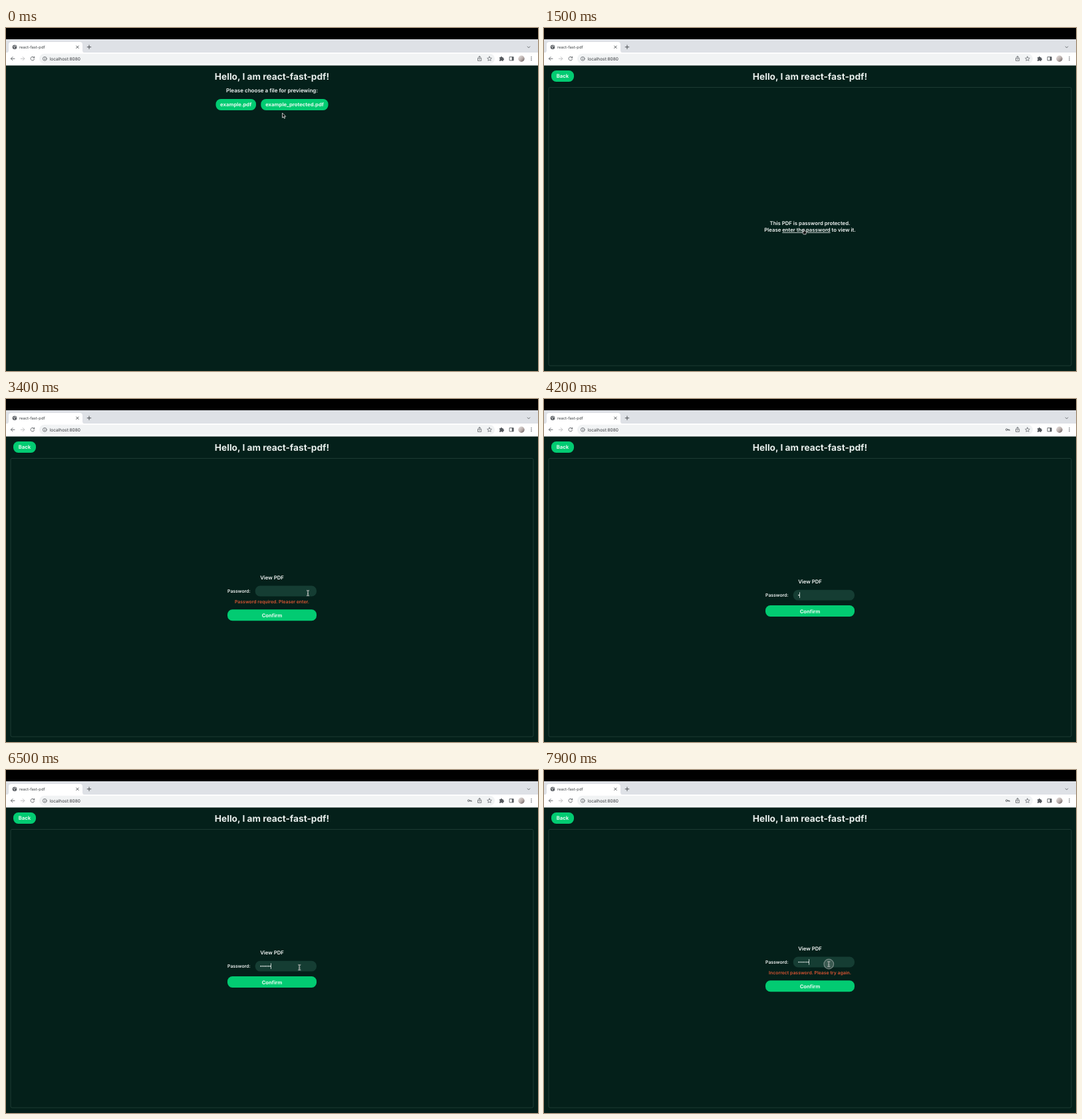
Animation of 800 by 517 pixels, one loop 8000 ms. Source, as an HTML page:

```html
<!DOCTYPE html>
<html lang="en">
<head>
<meta charset="utf-8">
<title>react-fast-pdf</title>
<style>
  html, body { margin: 0; width: 100%; height: 100%; overflow: hidden; background: #04201a; }
  svg { display: block; width: 100vw; height: 100vh; }
  text { font-family: Inter, "Open Sans", sans-serif; text-rendering: geometricPrecision; }
  .page text { font-weight: 600; fill: #f3f6f5; text-anchor: middle; font-size: 7.75px; }
  .page .title { font-weight: 700; font-size: 13.7px; fill: #e8eeec; }
  .page .small { font-size: 6.8px; }
  .page .error { font-size: 6.9px; fill: #dc5533; }
  .page .btn rect { fill: #02cb72; }
  .page .btn text { font-weight: 700; font-size: 7.7px; fill: #e6fbf0; }
  .icon { fill: none; stroke: #5a5e63; stroke-width: .9; stroke-linecap: round; stroke-linejoin: round; }
  .solid { fill: #55595e; }
</style>
</head>
<body>
<svg viewBox="0 0 800 517" preserveAspectRatio="none">
  <defs>
    <linearGradient id="avatar" x2="1" y2="1">
      <stop stop-color="#e9e4e2"/><stop offset=".55" stop-color="#b9aeab"/><stop offset="1" stop-color="#5d5355"/>
    </linearGradient>
  </defs>

  <g id="browser">
    <rect width="800" height="17"/>
    <rect y="17" width="800" height="20" fill="#dee1e6"/>
    <path d="M0 37.5Q4 37.5 4 33.500V25Q4 21 8 21H111Q115 21 115 25V33.500Q115 37.500 119 37.500Z" fill="#fff"/>
    <rect y="37" width="800" height="19.500" fill="#fff"/>
    <rect x="50" y="38.800" width="685" height="15" rx="7.500" fill="#f1f3f4"/>
    <circle class="solid" cx="13" cy="28.800" r="3.300"/>
    <path d="M10.800 27.500l2 .8-.4 1.400 1 1.300M13.300 26.200l.6 1.200 1.500.5" fill="none" stroke="#fff" stroke-width=".8"/>
    <text x="20" y="31" font-size="5.800" fill="#3c4043">react-fast-pdf</text>
    <text x="65.700" y="48.500" font-size="6.550" fill="#35383c">localhost:8080</text>
    <g class="icon">
      <path d="M105.700 27l3.500 3.500m0-3.500l-3.500 3.500M122.200 28.700h5.600m-2.800-2.800v5.600" stroke="#3f4347"/>
      <path d="M784.200 28l1.800 1.800 1.800-1.800"/>
      <path d="M13 46.200H7.500m2.500-2.600l-2.600 2.600 2.600 2.600"/>
      <path d="M22.300 46.200h5.500m-2.500-2.600l2.600 2.600-2.600 2.600" stroke="#babcbe"/>
      <path d="M42.200 44.500a2.800 2.800 0 1 0 .4 2.500M42.700 43.200v1.800h-1.800"/>
      <circle cx="58.300" cy="46.300" r="2.900" stroke-width=".8"/>
      <path d="M58.300 46.200v1.500m0-3v.1" stroke-width=".8"/>
      <path d="M710.900 45.300h-1.400v4h5.200v-4h-1.400M712.100 47.500v-5m-1.500 1.400l1.500-1.500 1.500 1.500" stroke-width=".8"/>
      <path d="M727 43l1 2.200 2.400.2-1.800 1.600.5 2.300-2.100-1.200-2.100 1.200.5-2.300-1.800-1.600 2.400-.2Z" stroke-width=".7"/>
      <rect x="757.500" y="43.600" width="5.600" height="5.300"/>
    </g>
    <path class="solid" d="M742 44.200h1.700a1.200 1.200 0 0 1 2.400 0h1.700v1.600a1.200 1.200 0 0 1 0 2.400v1.500h-1.900a1.100 1.100 0 0 0-2.100 0H742v-1.900a1.100 1.100 0 0 0 0-2.100Z"/>
    <rect class="solid" x="760.700" y="43.600" width="2.400" height="5.300"/>
    <circle cx="775" cy="46.200" r="4.700" fill="url(#avatar)"/>
    <g class="solid"><circle cx="790" cy="43.800" r=".75"/><circle cx="790" cy="46.200" r=".75"/><circle cx="790" cy="48.600" r=".75"/></g>
    <g id="key">
      <circle class="icon" cx="695.700" cy="46.200" r="1.400" stroke-width="1.100"/>
      <path class="icon" d="M697.200 46.200h2.900v1.300m-1.300-1.200v1" stroke-width="1.100"/>
    </g>
  </g>

  <g class="page">
    <text class="title" x="400" y="77.800">Hello, I am react-fast-pdf!</text>

    <g id="chooser">
      <text x="400" y="97.200" style="font-size:8.050px">Please choose a file for previewing:</text>
      <g class="btn"><rect x="315.500" y="107" width="60.500" height="17" rx="7.500"/><text x="345.700" y="118.200">example.pdf</text></g>
      <g class="btn"><rect x="383.300" y="107" width="101.200" height="17" rx="7.500"/><text x="434" y="118.200">example_protected.pdf</text></g>
    </g>

    <g id="viewer">
      <g class="btn"><rect x="11" y="64" width="34" height="17" rx="7.500"/><text x="28" y="75.300">Back</text></g>
      <rect x="7" y="89.500" width="786" height="419.500" rx="2" fill="none" stroke="#1c3b33"/>
    </g>

    <g id="locked">
      <text x="400" y="297.300">This PDF is password protected.</text>
      <text x="400" y="307.100">Please <tspan text-decoration="underline">enter the password</tspan> to view it.</text>
    </g>

    <g id="form">
      <g id="fields">
        <text x="400" y="278.300">View PDF</text>
        <text class="small" x="350.300" y="298.200">Password:</text>
        <rect x="374.700" y="287.800" width="92.300" height="15.800" rx="7.500" fill="#153d33"/>
        <g id="dots" fill="#f0f4f2"></g>
        <rect id="caret" y="291.300" width=".8" height="8.600" fill="#e8eeec"/>
      </g>
      <text class="error" id="error" x="400" y="308"></text>
      <g class="btn" id="confirm"><rect x="333" y="311" width="134" height="17" rx="7.500"/><text x="400" y="322.500">Confirm</text></g>
    </g>
  </g>

  <g id="cursor">
    <circle id="ring" r="7.300" fill="#8d9a95" fill-opacity=".3" stroke="#a3aeaa" stroke-opacity=".65" stroke-width="1.200"/>
    <path id="arrow" d="M0 0V7.300L1.700 5.800 2.900 8.400 4.100 7.900 2.900 5.300H5.200Z" fill="#111" stroke="#fff" stroke-width=".7"/>
    <path id="hand" d="M-.8-2.200Q0-3 .6-2.200V.3L2.800.8Q3.600 1.100 3.500 2L3 5.400H-.8L-2.800 2.400Q-2.600 1.200-.8 2.500Z" fill="#111" stroke="#fff" stroke-width=".7"/>
    <g id="beam" fill="none">
      <path d="M-1.900-4Q-.2-4 0-3 .2-4 1.900-4M0-3V3M-1.900 4Q-.2 4 0 3 .2 4 1.900 4M-1 .9H1" stroke="#d9e0dd" stroke-width="1.500"/>
      <path d="M-1.700-4Q-.2-4 0-3 .2-4 1.700-4M0-3V3M-1.700 4Q-.2 4 0 3 .2 4 1.700 4" stroke="#26362f" stroke-width=".6"/>
    </g>
  </g>
</svg>
<script>
const LOOP = 8000, STEP = 100, PITCH = 2.35;
const $ = id => document.getElementById(id);
const show = (id, on) => $(id).style.display = on ? '' : 'none';
const within = (t, a, b) => t >= a && t < b;

// time, x, y of the pointer
const path = [
  [0, 415.5, 128], [400, 429, 117], [600, 429, 117], [1400, 391, 305.5],
  [2100, 391, 305.5], [2400, 446, 291], [2700, 432, 322], [3000, 432, 322],
  [3400, 454, 292.5], [3500, 456, 293], [3700, 512, 299], [5400, 512, 299],
  [5700, 562, 293], [6300, 443, 297], [6400, 441.3, 297.5], [6600, 441.3, 297.5],
  [7000, 433, 329], [7300, 433, 329], [7800, 428.3, 292.5], [8000, 428.3, 292.5]
];
const clicks = [500, 1700, 2700, 3500, 7100, 7900];
const typed = [4100, 4300, 4500, 4800, 5000, 5200, 5500];

for (let i = 0; i < typed.length; i++) {
  const dot = document.createElementNS('http://www.w3.org/2000/svg', 'circle');
  dot.setAttribute('cx', 383.1 + i * PITCH);
  dot.setAttribute('cy', 295.7);
  dot.setAttribute('r', .85);
  $('dots').append(dot);
}

function pointer(t) {
  const i = path.findIndex(p => p[0] > t);
  const [t0, x0, y0] = path[i - 1], [t1, x1, y1] = path[i];
  const u = (t - t0) / (t1 - t0), e = u * u * (3 - 2 * u);
  return [x0 + (x1 - x0) * e, y0 + (y1 - y0) * e];
}

function shape(x, y, t, shift) {
  const over = (l, r, top, bottom) => within(x, l, r) && within(y, top, bottom);
  if (t < 600) return over(383, 485, 107, 124) ? 'hand' : 'arrow';
  if (t < 1800) return over(359, 431, 299, 309) ? 'hand' : 'arrow';
  if (over(375, 467, 288 - shift, 304 - shift)) return 'beam';
  return over(333, 467, 311 + shift, 328 + shift) ? 'hand' : 'arrow';
}

function caretOn(t, count) {
  if (t >= 7900) return true;
  if (!within(t, 3500, 7100)) return false;
  const since = t - (count ? typed[count - 1] : 3500);
  return !count || since % 1000 < 500;
}

function draw(t) {
  const empty = within(t, 2900, 4100), wrong = t >= 7300;
  const shift = empty || wrong ? 6.2 : 0;
  const count = typed.filter(k => k <= t).length;

  show('chooser', t < 600);
  show('viewer', t >= 600);
  show('locked', within(t, 600, 1800));
  show('form', t >= 1800);
  show('key', t >= 4100);
  $('fields').setAttribute('transform', `translate(0 ${-shift})`);
  $('confirm').setAttribute('transform', `translate(0 ${shift})`);
  $('error').textContent = empty ? 'Password required. Pleaser enter.'
    : wrong ? 'Incorrect password. Please try again.' : '';

  [...$('dots').children].forEach((dot, i) => dot.style.display = i < count ? '' : 'none');
  $('caret').setAttribute('x', 381.7 + count * PITCH);
  show('caret', caretOn(t, count));

  const [x, y] = pointer(t), kind = shape(x, y, t, shift);
  show('cursor', !within(t, 4100, 5500));
  $('cursor').setAttribute('transform', `translate(${x} ${y})`);
  for (const id of ['arrow', 'hand', 'beam']) show(id, id === kind);
  show('ring', clicks.some(c => within(t, c, c + 200)));
}

function tick() {
  draw(Math.floor(performance.now() % LOOP / STEP) * STEP);
  requestAnimationFrame(tick);
}
tick();
</script>
</body>
</html>
```
